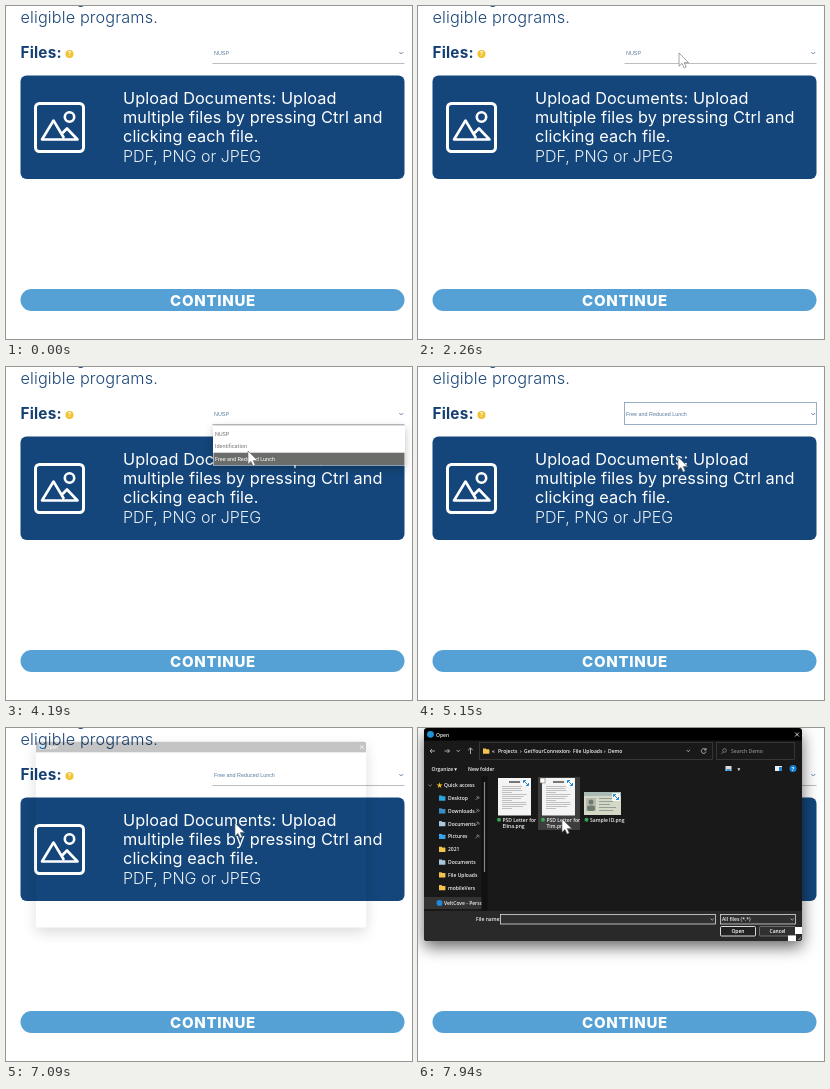
Write an HTML page that moves like this. It is 406 by 333 pixels and loops after 8 s.

```html
<!DOCTYPE html>
<html lang="en">
<head>
<meta charset="utf-8">
<title>Upload documents</title>
<style>
html, body { margin: 0; width: 100%; height: 100%; overflow: hidden; background: #fff; }
svg { position: absolute; left: 0; top: 0; overflow: hidden; }
#stage { position: relative; width: 406px; height: 333px; overflow: hidden; }
#window { position: absolute; left: 6px; top: 0; width: 378px; height: 213px; border-radius: 3px;
  box-shadow: 0 6px 16px rgba(0,0,0,.6); }
#window svg { border-radius: 3px; }
#list { position: absolute; left: 206.5px; top: 58px; width: 192px; height: 40.5px;
  box-shadow: 0 3px 8px rgba(0,0,0,.25); }
text { white-space: pre; }
</style>
</head>
<body>
<div id="stage">
  <svg id="page" width="406" height="333"></svg>
  <div id="list"></div>
  <div id="window"></div>
  <svg width="406" height="333"><path id="cursor" d="M0 0V13.2L3 10.4 5.1 15 7.2 14 5.2 9.6H9.6Z"
    fill="#fff" stroke="#666" stroke-width=".6"/></svg>
</div>
<script>
const $ = id => document.getElementById(id);
const UI = "Inter, sans-serif", FORM = "'Liberation Sans', Arial, sans-serif",
      MENU = "Roboto, sans-serif", SYS = "'Open Sans', sans-serif";
const NAVY = '#14467b', INK = '#1b4677', PALE_INK = '#5a7ba0';

const text = (x, y, s, size, fill, font = UI, weight = 400, extra = '') =>
  `<text x="${x}" y="${y}" font-size="${size}" fill="${fill}" font-family="${font}" font-weight="${weight}" ${extra}>${s}</text>`;
const rect = (x, y, w, h, fill, extra = '') =>
  `<rect x="${x}" y="${y}" width="${w}" height="${h}" fill="${fill}" ${extra}/>`;
const line = (d, color, width = 1, extra = '') =>
  `<path d="${d}" fill="none" stroke="${color}" stroke-width="${width}" ${extra}/>`;
const dot = (x, y, r, fill, extra = '') => `<circle cx="${x}" cy="${y}" r="${r}" fill="${fill}" ${extra}/>`;
const svg = (w, h, body) => `<svg width="${w}" height="${h}">${body}</svg>`;

// Web page
$('page').innerHTML =
  text(70, -3, 'g', 16.3, INK, UI, 300) +
  text(14.5, 17, 'eligible programs.', 16.3, INK, UI, 300, 'letter-spacing=".13"') +
  text(14.5, 52, 'Files:', 15.3, '#143f72', UI, 700, 'letter-spacing=".2"') +
  dot(63.5, 48, 4, '#f1c232') +
  text(63.5, 50.3, '?', 6, '#fff', UI, 700, 'text-anchor="middle"') +
  text(208, 48.6, '', 5.4, PALE_INK, FORM, 400, 'id="choice"') +
  line('M206.5 57.5H398.5', '#bdbdbd', 1, 'id="underline"') +
  rect(206.5, 35.5, 192, 22, 'none', 'id="focus" stroke="#8099b8" stroke-width=".8"') +
  line('M393.3 46l2 2 2-2', PALE_INK, .9) +
  rect(14.5, 69.5, 384, 103.5, NAVY, 'rx="6"') +
  rect(29.5, 97.5, 48, 48, 'none', 'rx="4" stroke="#fff" stroke-width="3"') +
  dot(63.5, 111, 4.7, 'none', 'stroke="#fff" stroke-width="2.6"') +
  line('M58 132L47.5 114.5 36 133.5H71.5L61 122.5 55 128.5', '#fff', 2.6, 'stroke-linejoin="round"') +
  ['Upload Documents: Upload', 'multiple files by pressing Ctrl and', 'clicking each file.']
    .map((s, i) => text(117, 98 + 19 * i, s, 16.3, '#fff', UI, 400, 'letter-spacing=".08"')).join('') +
  text(117, 156, 'PDF, PNG or JPEG', 16, '#e8eff6', UI, 300) +
  rect(14.5, 283, 384, 22, '#55a1d5', 'rx="11"') +
  text(207, 300, 'CONTINUE', 15, '#fff', UI, 800, 'text-anchor="middle" letter-spacing=".7"');

// Drop-down list
const options = ['NUSP', 'Identification', 'Free and Reduced Lunch'];
$('list').innerHTML = svg(192, 41,
  rect(0, 0, 192, 40.5, '#fff') + rect(0, 0, 192, 1, '#ddd') +
  options.map((s, i) =>
    rect(.5, 2.5 + 12.6 * i, 191, 12.4, '#6b6d6b', 'class="row"') +
    text(2, 10.7 + 12.6 * i, s, 5.5, '#777', MENU, 400, 'class="option"')).join(''));
const rows = [...document.querySelectorAll('.row')], labels = [...document.querySelectorAll('.option')];

// File dialog; coordinates are relative to the stage
const label = (x, y, s, fill = '#eee', extra = '') => text(x, y, s, 5, fill, SYS, 600, extra);
const folder = (x, y, fill = '#f3c34e') =>
  rect(x, y - 2.5, 3, 2, fill) + rect(x, y - 1.7, 6.4, 4.4, fill, 'rx=".5"');

const title = rect(6, 0, 378, 12.5, '#000') + dot(12.5, 6.3, 3.4, '#1f93d6') +
  label(18, 8.6, 'Open') + line('M377 4.5l4 4m0-4l-4 4', '#fff', .8);

const blank = rect(6, 12, 378, 201, '#fff') + rect(62, 48, 7, 135, '#191919') +
  line('M65.3 54V144', '#777', 1.2) + rect(6, 183, 378, 30, '#3b3b3b') +
  [[58, 187, 22, 7], [82, 186, 215, 10.5], [302, 186, 76, 10], [302, 198, 36, 10], [342, 198, 36, 10], [370, 200, 14, 13]]
    .map(b => rect(...b, '#fff')).join('');

const sidebar = [['Desktop', '#2aa5e0', 1], ['Downloads', '#3b8fc4', 1], ['Documents', '#a9c6dc', 1], ['Pictures', '#3aa0e8', 1],
  ['2021'], ['Documents', '#a9c6dc'], ['File Uploads'], ['mobileVers']]
  .map(([name, color, pinned], i) => {
    const y = 70 + 12.8 * i;
    return folder(21, y, color) + label(30, y + 1.9, name) +
      (pinned ? line(`M57.5 ${y + 2}l2-2m-1-1.5l2.5 2.5m-1.5-3l2 2`, '#aaa', .7) : '');
  }).join('');

const badge = (x, y) => rect(x - 4, y - 4, 8, 8, '#fff', 'opacity=".85"') +
  line(`M${x - 2.5} ${y - 2.5}l5 5m-5-2.5v-2.5h2.5m2.5 2.5v2.5h-2.5`, '#2389d7', 1);
const letter = x => {
  let s = rect(x, 50, 33, 37.5, '#f4f4f4') + rect(x + 11, 53, 11, 2, '#777');
  for (let i = 0; i < 12; i++)
    s += rect(x + 4, 58 + 2 * i, i % 4 == 3 ? 10 : 22 + 3 * Math.sin(i * 5), .7, '#aaa');
  return s + badge(x + 28, 55);
};
const file = (x, ...names) => dot(x, 91.7, 2, '#35a853') +
  names.map((s, i) => label(x + 3.5, 93.7 + 6 * i, s)).join('');

const files = letter(80) + file(81, 'PSD Letter for', 'Elina.png') +
  rect(120, 49, 42, 53, '#3d3d3d') + letter(124) + rect(122, 50, 5, 5, '#fff', 'stroke="#555" stroke-width=".5"') +
  file(125, 'PSD Letter for', 'Tim.png') +
  rect(166, 64, 37, 23, '#d5d8c6') + rect(166, 64, 37, 4, '#a9bdb6') + rect(168, 70, 10, 13, '#b5bcae') +
  dot(173, 74, 2.5, '#6f7a70') + rect(169, 77.5, 8, 5.5, '#6f7a70', 'rx="2"') +
  [70, 73, 76, 79, 82].map((y, i) => rect(181, y, 17 - 3 * (i % 3), .8, '#84908a')).join('') +
  badge(198, 69) + file(168.5, 'Sample ID.png');

const loaded = rect(6, 12, 378, 201, '#191919') +
  line('M17 23H12m2-2l-2 2 2 2M26.5 23h5m-2-2l2 2-2 2M38.5 22l1.7 1.7 1.7-1.7M52.5 26v-6m-2.3 2.2l2.3-2.3 2.3 2.3', '#ccc', .8) +
  rect(61.5, 14.5, 233, 17, '#191919', 'stroke="#444" stroke-width=".7"') + folder(65, 23) +
  label(74, 25, '«') +
  [[80, 'Projects'], [106, 'GetYourConnexion'], [155, 'File Uploads'], [190, 'Demo']]
    .map(([x, s], i) => label(x, 25, s) + (i ? label(x - 4, 25, '›') : '')).join('') +
  line('M268.5 22l1.7 1.7 1.7-1.7M287.6 21.5a2.4 2.4 0 1 0 .5 2M288 20v2h-2', '#ccc', .8) +
  rect(298.5, 14.5, 78, 17, '#191919', 'stroke="#444" stroke-width=".7"') +
  dot(306.5, 22.5, 1.8, 'none', 'stroke="#999" stroke-width=".7"') + line('M305.2 24l-1.8 1.8', '#999', .7) +
  label(313, 25, 'Search Demo', '#888') +
  label(13.5, 42.5, 'Organize ▾') + label(50, 42.5, 'New folder') +
  rect(307.5, 38, 6, 5, '#ddd') + rect(308.5, 41, 4, 2, '#3a9be0') + label(319.5, 42.5, '▾') +
  rect(357, 38, 7, 5, '#eee') + rect(361, 39, 3, 4, '#2487d8') +
  dot(375, 40.5, 3.5, '#1683d8') + text(375, 42.5, '?', 5, '#fff', SYS, 700, 'text-anchor="middle"') +
  line('M10.5 56.5l1.7 1.7 1.7-1.7M11.5 173.5l1.7 1.7-1.7 1.7', '#aaa', .7) +
  text(18, 60, '★', 8, '#f2bd2c', 'DejaVu Sans, sans-serif') + label(26, 59, 'Quick access') + sidebar +
  rect(6, 169, 59, 12, '#333') + dot(21.5, 175, 3, '#2188d9') + label(26, 177, 'VeltCove - Perso') +
  rect(63.5, 48, 6, 135, '#111') + line('M66.5 54V144', '#888', 1.2) + files +
  rect(6, 183, 378, 30, '#292929') + label(58, 193, 'File name:') +
  rect(82.5, 186.5, 215, 9.5, '#303030', 'stroke="#ddd" stroke-width=".8"') +
  rect(302.5, 186.5, 75, 9.5, '#303030', 'stroke="#ddd" stroke-width=".8"') + label(304, 193, 'All files (*.*)') +
  line('M292.5 190.5l1.7 1.7 1.7-1.7M372.5 190.5l1.7 1.7 1.7-1.7', '#ccc', .7) +
  rect(302.5, 198.5, 35, 9.5, '#222', 'rx="1" stroke="#eee" stroke-width=".9"') +
  rect(341.5, 198.5, 36, 9.5, '#303030', 'rx="1" stroke="#999" stroke-width=".6"') +
  label(320, 205, 'Open', '#fff', 'text-anchor="middle"') + label(359.5, 205, 'Cancel', '#fff', 'text-anchor="middle"') +
  rect(377, 199, 7, 7, '#fff') + rect(370, 207.5, 8, 5.5, '#fff') + line('M380 212l3-3m-1.5 3l1.5-1.5', '#aaa', .7) +
  rect(84, 187.5, .8, 7, '#fff', 'id="caret"');

$('window').innerHTML = `<svg width="378" height="213" viewBox="6 0 378 213">
  <g id="blank">${blank}</g><g id="loaded">${loaded}</g>${title}</svg>`;

// Tracks: rows of [time, values...], linear in between
const pointer = [
  [0, 410, 336], [100, 402, 330], [300, 397, 308], [500, 409, 289], [1320, 409, 60],
  [1380, 402, 60], [1700, 335, 54], [2130, 272, 48], [2260, 261, 47], [3060, 261, 47],
  [3400, 252, 76], [3600, 252, 76], [3900, 250, 89], [4190, 242, 84], [4730, 242, 84],
  [4740, 252, 84], [4880, 252, 84], [5150, 260, 90], [5560, 259, 92], [5750, 239, 94],
  [6200, 239, 94], [6210, 238, 93], [6350, 238, 93], [6680, 229, 95], [7330, 229, 95],
  [7680, 157, 90], [7940, 144, 91]];
const opening = [ // scale, opacity, body opacity
  [6960, .85, 0, 0], [7090, .873, .22, 0], [7190, .97, .9, .9], [7240, .99, 1, 1], [7310, 1, 1, 1]];

function track(keys, t) {
  const i = keys.findIndex(k => k[0] > t);
  if (i < 0) return keys[keys.length - 1].slice(1);
  if (i === 0) return keys[0].slice(1);
  const a = keys[i - 1], b = keys[i], p = (t - a[0]) / (b[0] - a[0]);
  return a.slice(1).map((v, n) => v + (b[n + 1] - v) * p);
}
const show = (el, on) => el.style.display = on ? '' : 'none';

function draw(t) {
  const [x, y] = track(pointer, t);
  $('cursor').setAttribute('transform', `translate(${x} ${y})`);

  const chosen = t >= 4880, focused = chosen && t < 6350;
  $('choice').textContent = options[chosen ? 2 : 0];
  show($('focus'), focused);
  show($('underline'), !focused);

  show($('list'), t >= 2530 && !chosen);
  const active = t < 2670 ? -1 : t < 3260 ? 0 : t < 3780 ? 1 : 2;
  rows.forEach((row, i) => {
    show(row, i === active);
    labels[i].setAttribute('fill', i === active ? '#fff' : '#777');
  });

  const [scale, alpha, body] = track(opening, t), dialog = $('window');
  show(dialog, t >= 6960);
  dialog.style.transform = `scale(${scale})`;
  dialog.style.opacity = alpha;
  $('blank').style.opacity = body;
  show($('loaded'), t >= 7400);
  show($('caret'), t >= 7400 && t < 7880);
}

function tick() {
  draw(performance.now() % 8000);
  requestAnimationFrame(tick);
}
tick();
</script>
</body>
</html>
```
